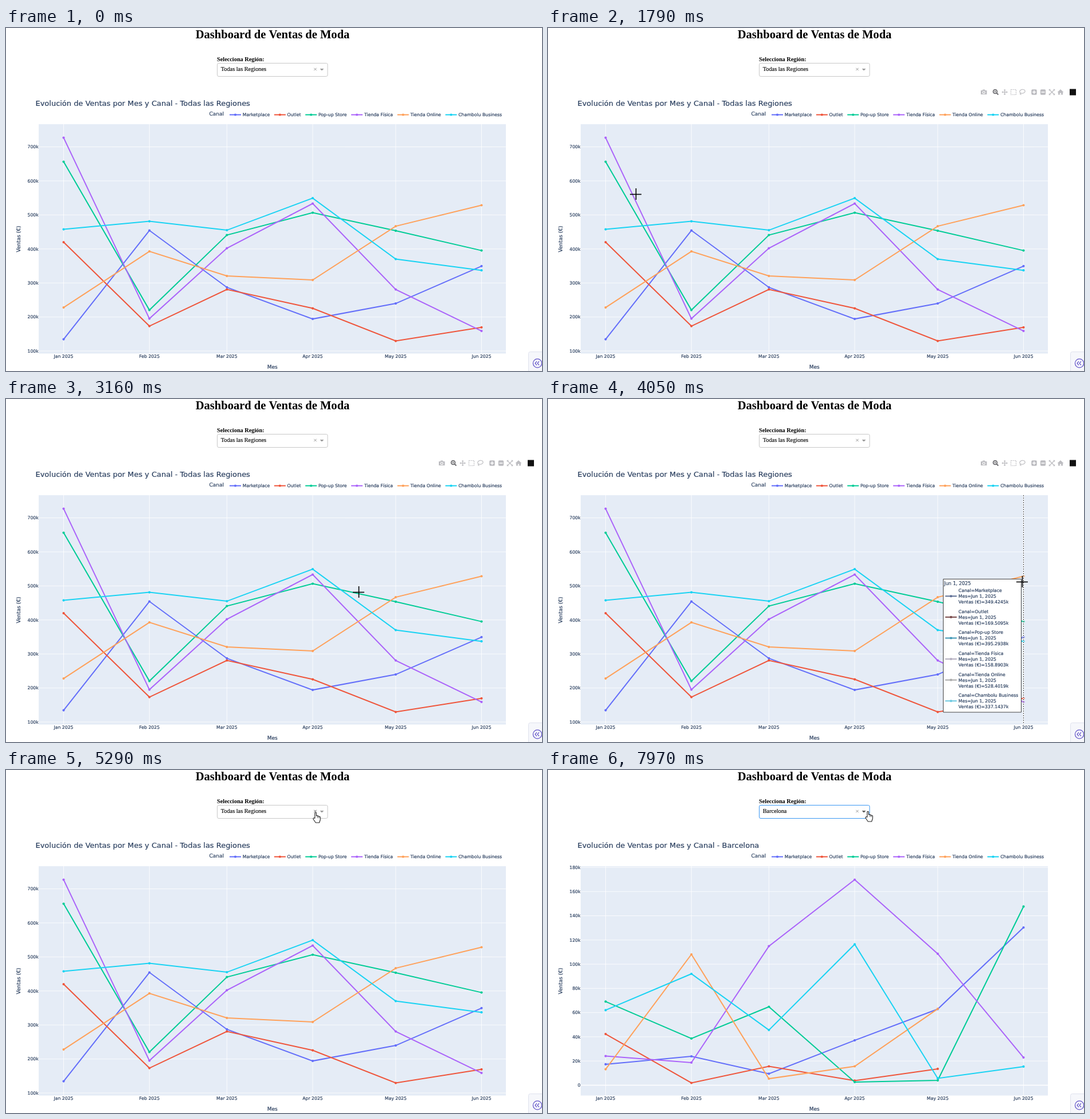
An HTML page with a canvas for the animation above (8000 ms loop, 935x599 px).

```html
<!DOCTYPE html>
<html lang="es">
<head>
<meta charset="utf-8">
<title>Dashboard de Ventas de Moda</title>
<style>
html, body { margin: 0; width: 100%; height: 100%; overflow: hidden; background: #fff; }
canvas { display: block; width: 935px; height: 599px; }
</style>
</head>
<body>
<canvas id="stage" width="935" height="599"></canvas>
<script>
const ctx = document.getElementById('stage').getContext('2d');
const LOOP = 8000, STEP = 112.5;
const SANS = '"DejaVu Sans", sans-serif';
const SERIF = '"Liberation Serif", serif';
const INK = '#2a3f5f', SMALL = 7.74;
const PLOT = { x: 57, y: 168, w: 815, h: 400.5, right: 872, bottom: 568.5 };
const MONTHS = ['Jan', 'Feb', 'Mar', 'Apr', 'May', 'Jun'];
const MONTH_X = MONTHS.map((_, m) =>
  100.5 + (Date.UTC(2025, m) - Date.UTC(2025, 0)) / 864e5 * 729 / 151);
const REGIONS = ['Todas las Regiones', 'Barcelona', 'Bilbao', 'Las Palmas', 'Madrid', 'Murcia'];

// Monthly sales in thousands: all regions, then one city
const CHANNELS = [
  { name: 'Marketplace', color: '#636efa', key: '#5f7096', sales: [
    [134.5127, 454.3316, 287.0482, 194.2, 239.7, 349.4245], [17.3, 23.9, 9.5, 37.1, 62.9, 130.3]] },
  { name: 'Outlet', color: '#ef553b', key: '#7a4b4b', sales: [
    [419.8134, 173.2461, 280.9273, 225.4, 129.5, 169.5095], [42.3, 1.9, 15.6, 3.8, 13.5]] },
  { name: 'Pop-up Store', color: '#00cc96', key: '#3f97b5', sales: [
    [656.2148, 220.3372, 440.8265, 506.4, 453.4, 395.2938], [69.1, 38.6, 64.8, 2.6, 4, 147.6]] },
  { name: 'Tienda Física', color: '#ab63fa', key: '#b3aebf', sales: [
    [726.9351, 195.1284, 402.1437, 533.4, 280.9, 158.8903], [24.1, 18.7, 114.9, 169.8, 108.6, 22.9]] },
  { name: 'Tienda Online', color: '#ffa15a', key: '#aaa', sales: [
    [227.9246, 392.8153, 320.5318, 308.7, 466.9, 528.4019], [13.2, 108.1, 5.4, 15.6, 63.1]] },
  { name: 'Chambolu Business', color: '#19d3f3', key: '#6cc8e0', sales: [
    [457.6382, 481.2294, 455.1176, 549.3, 370.1, 337.1437], [62, 92, 45.6, 116.4, 5.7, 15.4]] }
];
const VIEWS = [
  { zero: 623.5, unit: 0.5942, first: 100, tick: 100 },
  { zero: 550.5, unit: 2.114, first: 0, tick: 20 }
].map((axis, i) => ({ ...axis, name: REGIONS[i], rows: CHANNELS.map(c => c.sales[i]) }));

const linear = k => k;
const easeIn = k => k * k;
const easeOut = k => 1 - (1 - k) ** 2;
const glide = k => 1 - (1 - k) ** 4;

// The pointer reaches each place at its step
const PATH = [
  { at: 3, x: 205, y: 554 },
  { at: 10, x: 116, y: 292, ease: easeOut },
  { at: 13, x: 104, y: 284, ease: easeOut },
  { at: 14, x: 104, y: 284, ease: linear },
  { at: 22, x: 300, y: 308, ease: linear },
  { at: 28, x: 615, y: 337, ease: easeIn },
  { at: 36, x: 827, y: 319, ease: glide },
  { at: 39, x: 827, y: 319, ease: linear },
  { at: 47, x: 540, y: 74, ease: easeOut },
  { at: 49, x: 550, y: 75, ease: linear },
  { at: 51, x: 550, y: 75, ease: linear },
  { at: 55, x: 449, y: 118, ease: easeOut },
  { at: 60, x: 449, y: 118, ease: linear },
  { at: 64, x: 482, y: 76, ease: easeOut },
  { at: 71, x: 558, y: 72, ease: easeOut }
];

const clamp = v => Math.max(0, Math.min(1, v));
const valueY = (view, v) => view.zero - v * view.unit;

function pointerAt(step) {
  const i = Math.max(1, PATH.findIndex(p => p.at >= step));
  const a = PATH[i - 1], b = PATH[i];
  const k = b.ease((step - a.at) / (b.at - a.at));
  return { x: a.x + (b.x - a.x) * k, y: a.y + (b.y - a.y) * k };
}

function text(str, x, y, size, { align = 'left', color = INK, family = SANS, weight = '' } = {}) {
  ctx.font = `${weight} ${size}px ${family}`;
  ctx.textAlign = align;
  ctx.fillStyle = ctx.strokeStyle = color;
  ctx.lineWidth = 0.2;
  ctx.fillText(str, x, y);
  if (!weight) ctx.strokeText(str, x, y);
}

function rect(x, y, w, h, color) {
  ctx.fillStyle = color;
  ctx.fillRect(x, y, w, h);
}

function line(points, color, width) {
  ctx.beginPath();
  points.forEach(([x, y]) => ctx.lineTo(x, y));
  ctx.strokeStyle = color;
  ctx.lineWidth = width;
  ctx.stroke();
}

function dot(x, y, r, color) {
  ctx.beginPath();
  ctx.arc(x, y, r, 0, Math.PI * 2);
  ctx.fillStyle = color;
  ctx.fill();
}

function ring(x, y, r, color, width) {
  ctx.beginPath();
  ctx.arc(x, y, r, 0, Math.PI * 2);
  ctx.strokeStyle = color;
  ctx.lineWidth = width;
  ctx.stroke();
}

function shape(points, fill, stroke) {
  ctx.beginPath();
  points.forEach(([x, y]) => ctx.lineTo(x, y));
  ctx.closePath();
  ctx.fillStyle = fill;
  ctx.fill();
  if (!stroke) return;
  ctx.strokeStyle = stroke;
  ctx.lineWidth = 1;
  ctx.stroke();
}

function box(x, y, w, h, radius, fill, stroke) {
  ctx.beginPath();
  ctx.roundRect(x, y, w, h, radius);
  ctx.fillStyle = fill;
  ctx.fill();
  ctx.strokeStyle = stroke;
  ctx.lineWidth = 1;
  ctx.stroke();
}

function keyLine(x, y, color) {
  line([[x, y], [x + 20, y]], color, 2);
  dot(x + 10, y, 2.1, color);
}

function drawLegend() {
  text('Canal', 354.5, 153.3, 9);
  let x = 390;
  for (const { name, color } of CHANNELS) {
    keyLine(x, 151.5, color);
    text(name, x + 22.8, 154.2, SMALL);
    x += 22.8 + ctx.measureText(name).width + 7.6;
  }
}

function drawChart(view) {
  const { x, y, w, h, right, bottom } = PLOT;
  text(`Evolución de Ventas por Mes y Canal - ${view.name}`, 51.5, 136, 12.97);
  drawLegend();

  rect(x, y, w, h, '#e5ecf6');
  MONTH_X.forEach((mx, i) => {
    line([[mx, y], [mx, bottom]], '#fff', 0.8);
    text(`${MONTHS[i]} 2025`, mx, 576.4, SMALL, { align: 'center' });
  });
  for (let v = view.first; valueY(view, v) > y; v += view.tick) {
    const ty = valueY(view, v);
    line([[x, ty], [right, ty]], '#fff', v ? 0.8 : 1.4);
    text(v ? `${v}k` : '0', 56.7, ty + 2.8, SMALL, { align: 'right' });
  }
  text('Mes', 464.7, 595, 9, { align: 'center' });
  ctx.save();
  ctx.translate(24.5, 368.5);
  ctx.rotate(-Math.PI / 2);
  text('Ventas (€)', 0, 0, 9, { align: 'center' });
  ctx.restore();

  view.rows.forEach((row, i) => {
    const points = row.map((v, m) => [MONTH_X[m], valueY(view, v)]);
    line(points, CHANNELS[i].color, 2);
    points.forEach(([px, py]) => dot(px, py, 2.1, CHANNELS[i].color));
  });
}

function drawTooltip(view, month) {
  const x = Math.round(MONTH_X[month] - 1) + 0.5;
  const spike = [[x, PLOT.y], [x, PLOT.bottom]];
  line(spike, 'rgba(255,255,255,.9)', 2);
  ctx.setLineDash([2, 2]);
  line(spike, '#444', 1);
  ctx.setLineDash([]);

  const values = view.rows.map(row => row[month]);
  const mean = values.reduce((sum, v) => sum + valueY(view, v), 0) / values.length;
  const width = 136;
  const left = x + 4 + width > PLOT.right ? x - 4 - width : x + 4;
  const top = Math.floor(mean - 117) + 0.5;
  const date = `${MONTHS[month]} 1, 2025`;
  box(left, top, width, 232.5, 0, '#fff', '#444');
  text(date, left + 1.5, top + 10.5, 8.2);
  values.forEach((v, i) => {
    const y = top + 29.8 + i * 36.6;
    keyLine(left + 3.5, y, CHANNELS[i].key);
    [`Canal=${CHANNELS[i].name}`, `Mes=${date}`, `Ventas (€)=${v.toFixed(4)}k`]
      .forEach((str, n) => text(str, left + 26.5, y - 7.2 + n * 10, SMALL));
  });
}

function drawModebar(alpha) {
  if (alpha <= 0) return;
  const gray = '#bdbdc1', active = '#6f6f73', y = 112;
  ctx.save();
  ctx.globalAlpha = alpha;

  // Camera
  rect(755, 109, 10.5, 7, gray);
  rect(758, 107.5, 4.5, 2, gray);
  dot(760.2, 112.5, 2.5, '#fff');
  dot(760.2, 112.5, 1.4, gray);

  // Zoom
  ring(780, 111, 3.4, active, 1.8);
  line([[782.5, 113.5], [785.5, 116.5]], active, 2);
  line([[778.3, 111], [781.7, 111]], active, 1);
  line([[780, 109.3], [780, 112.7]], active, 1);

  // Pan
  ctx.save();
  ctx.translate(796.7, y);
  for (let i = 0; i < 4; i++) {
    line([[0, 0], [4, 0]], gray, 1.3);
    shape([[5.3, 0], [3, 2], [3, -2]], gray);
    ctx.rotate(Math.PI / 2);
  }
  ctx.restore();

  // Box and lasso select
  ctx.setLineDash([2, 1.2]);
  ctx.strokeStyle = gray;
  ctx.lineWidth = 1.2;
  ctx.strokeRect(807.5, 107.5, 9, 9);
  ctx.setLineDash([]);
  ctx.beginPath();
  ctx.ellipse(827.5, 110.7, 4.7, 3.4, -0.2, 0, Math.PI * 2);
  ctx.stroke();
  line([[824.5, 113], [823.5, 115], [825.5, 116.5]], gray, 1.2);

  // Zoom in and out
  for (const x of [848, 863.5]) {
    box(x - 4.2, 107.8, 8.4, 8.4, 1, gray, gray);
    line([[x - 3, y], [x + 3, y]], '#fff', 1.5);
  }
  line([[848, 109], [848, 115]], '#fff', 1.5);

  // Autoscale
  ctx.save();
  ctx.translate(879, y);
  for (let i = 0; i < 4; i++) {
    line([[0, 0], [4, 4]], gray, 1.2);
    line([[2.4, 4.7], [4.7, 4.7], [4.7, 2.4]], gray, 1.1);
    ctx.rotate(Math.PI / 2);
  }
  ctx.restore();

  // Home
  shape([[894, 107], [899.5, 112.3], [888.5, 112.3]], gray);
  rect(890, 112, 8, 4.5, gray);
  rect(892.8, 113.5, 2.4, 3, '#fff');

  rect(910, 106.5, 11, 11, '#111');
  ctx.restore();
}

function drawHeader() {
  text('Dashboard de Ventas de Moda', 465, 18, 20.55,
    { align: 'center', color: '#000', family: SERIF, weight: 'bold' });
  text('Selecciona Región:', 368, 58, 10.3, { color: '#000', family: SERIF, weight: 'bold' });
}

function drawSelect(label, open, focused, pointer) {
  const tint = (from, to) =>
    pointer && pointer.y < 85 && pointer.x > from && pointer.x < to ? '#555' : '#999';
  box(368.5, 61.5, 192.5, 23, open ? [2.5, 2.5, 0, 0] : 2.5, '#fff', focused ? '#3b97f3' : '#c8c8c8');
  text(label, 374.7, 75.3, 10.3, { color: '#111', family: SERIF });
  const clear = tint(535, 545);
  line([[537.3, 69.8], [541.7, 74.2]], clear, 1);
  line([[541.7, 69.8], [537.3, 74.2]], clear, 1);
  const base = open ? 74.5 : 71, tip = open ? 71 : 74.5;
  shape([[547.6, base], [554.4, base], [551, tip]], tint(545, 561));
  if (open) rect(375, 67, 1, 11, '#222');
}

function drawMenu(pointer) {
  const rowH = 22.6, top = 84.5;
  const active = Math.max(0, Math.floor((pointer.y - top) / rowH));
  box(368.5, top, 192.5, 129.5, [0, 0, 2.5, 2.5], '#fff', '#c8c8c8');
  ctx.save();
  ctx.beginPath();
  ctx.rect(369, 85, 191.5, 128.5);
  ctx.clip();
  REGIONS.forEach((name, i) => {
    const y = top + i * rowH;
    if (i === active) rect(369, y, 178, rowH, '#e5f1fc');
    text(name, 374, y + 15, 10.3, { color: '#000', family: SERIF, weight: i ? '' : 'bold' });
  });
  rect(547, 85, 14, 129, '#f1f1f1');
  rect(547, 98, 14, 47, '#c4c4c4');
  ctx.restore();
  line([[551, 92.8], [554, 89.8], [557, 92.8]], '#444', 1.5);
  line([[551, 205.7], [554, 208.7], [557, 205.7]], '#444', 1.5);
}

function drawCorner() {
  const purple = '#5f50c8';
  box(911.5, 565.5, 30, 40, 3, '#f6f7fb', '#dfe2ee');
  ring(927, 585.5, 7.6, purple, 1.2);
  for (const x of [923, 927]) {
    line([[x + 3, 582.2], [x, 585.5], [x + 3, 588.8]], purple, 1.2);
  }
}

function drawCross(x, y) {
  const cx = Math.round(x), cy = Math.round(y);
  rect(cx - 10, cy - 0.3, 20, 1.6, '#000');
  rect(cx - 0.3, cy - 10, 1.6, 20, '#000');
}

function drawHand() {
  ctx.beginPath();
  ctx.moveTo(-1.2, 10.5);
  ctx.lineTo(-1.2, 1.2);
  ctx.quadraticCurveTo(0, -0.8, 1.3, 1.2);
  ctx.lineTo(1.3, 6);
  ctx.quadraticCurveTo(3, 5, 3.8, 6.6);
  ctx.quadraticCurveTo(5.5, 5.8, 6.2, 7.4);
  ctx.quadraticCurveTo(8.4, 7, 8.4, 9);
  ctx.lineTo(8.2, 13);
  ctx.lineTo(6.6, 18);
  ctx.lineTo(0.2, 18);
  ctx.lineTo(-4.2, 11.5);
  ctx.quadraticCurveTo(-3.8, 8.6, -1.2, 10.5);
  ctx.fillStyle = '#fff';
  ctx.fill();
  ctx.strokeStyle = '#222';
  ctx.lineWidth = 1.1;
  ctx.stroke();
  line([[3.8, 6.8], [3.8, 10]], '#222', 0.8);
  line([[6.2, 7.6], [6.2, 10.2]], '#222', 0.8);
}

function drawArrow() {
  shape([[0.5, 0], [0.5, 12], [3.3, 9.5], [5.3, 14], [7.4, 13], [5.4, 8.8], [9, 8.6]], '#fff', '#222');
}

function drawPointer({ x, y }, open) {
  if (y > PLOT.y && !open) return drawCross(x, y);
  const onButtons = x > 533 && x < 562 && y > 61 && y < 85;
  ctx.save();
  ctx.translate(x, y);
  ctx.lineJoin = 'round';
  (onButtons ? drawHand : drawArrow)();
  ctx.restore();
}

function drawClick({ x, y }) {
  ctx.globalCompositeOperation = 'multiply';
  dot(x, y, 12, '#f5ef62');
  ctx.globalCompositeOperation = 'source-over';
}

function draw(time) {
  const step = Math.floor((time + 20) / STEP);
  const pointer = step >= PATH[0].at ? pointerAt(step) : null;
  const open = step >= 51 && step < 58;
  const chosen = step >= 58;
  const view = VIEWS[step < 59 ? 0 : 1];
  const fade = (from, to) => clamp(Math.min((step - from + 1) / 3, (to - step) / 3));

  rect(0, 0, 935, 599, '#fff');
  drawHeader();
  drawChart(view);
  drawModebar(fade(3, 47) + fade(58, 63));
  if (pointer && pointer.y > PLOT.y) {
    const month = MONTH_X.findIndex(x => Math.abs(x - pointer.x) < 11);
    if (month >= 0) drawTooltip(view, month);
  }
  drawCorner();
  drawSelect(REGIONS[chosen ? 1 : 0], open, chosen, pointer);
  if (open) drawMenu(pointer);
  if (pointer) drawPointer(pointer, open);
  if (step === 51 || step === 57) drawClick(pointer);
}

const start = performance.now();
function frame() {
  draw((performance.now() - start) % LOOP);
  requestAnimationFrame(frame);
}
frame();
</script>
</body>
</html>
```
